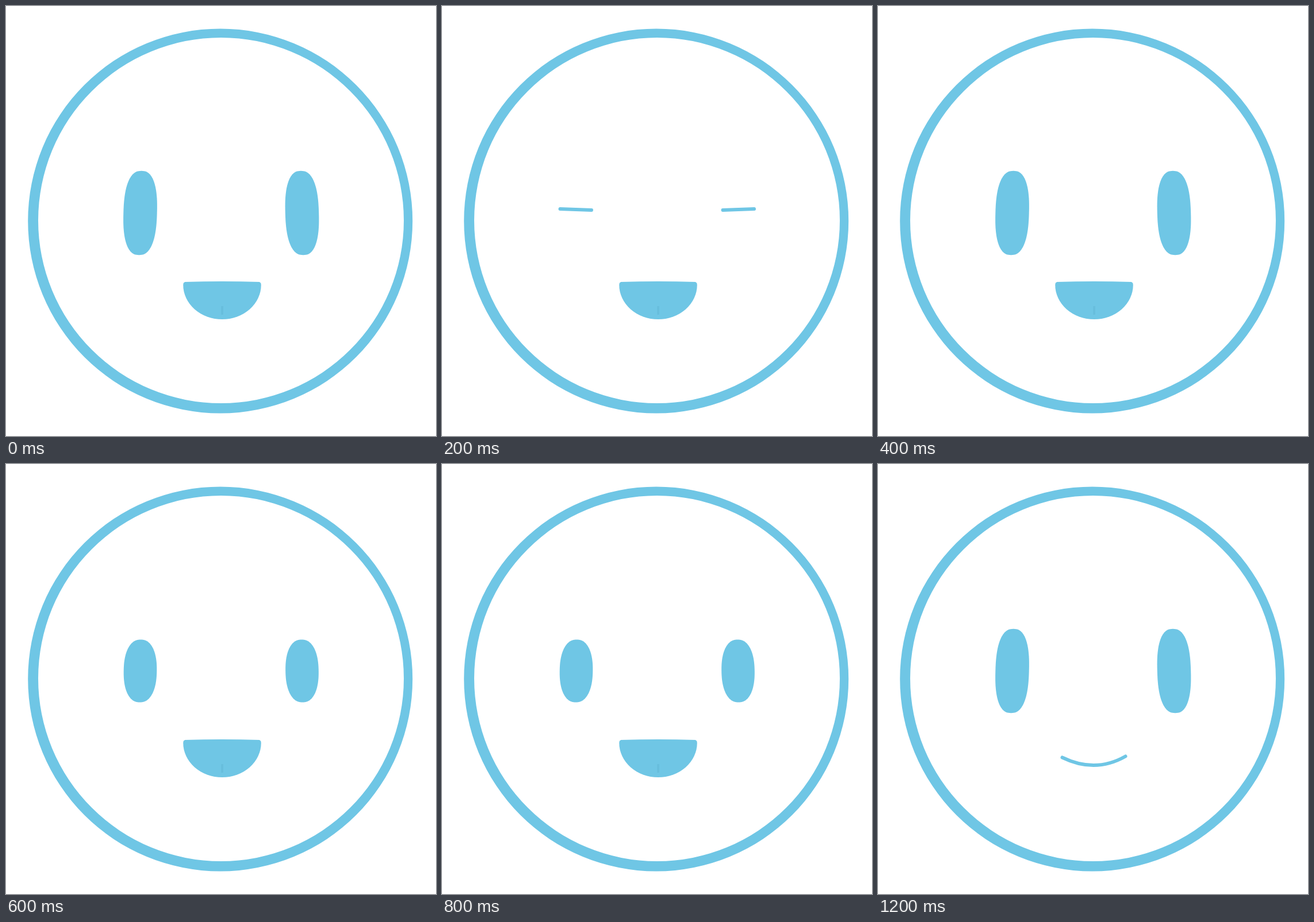
These frames come from a looping animation (748 px wide and 748 px high, 1.7 s). An HTML page with a canvas:

```html
<!DOCTYPE html>
<html lang="en">
<head>
<meta charset="utf-8">
<title>Blinking smiley</title>
<style>
  html, body { margin: 0; width: 100%; height: 100%; overflow: hidden; background: #fff; }
  canvas { display: block; }
</style>
</head>
<body>
<canvas id="stage" width="748" height="748"></canvas>
<script>
const ctx = document.getElementById('stage').getContext('2d');
const SIZE = 748, LOOP = 1700, STEP = 100, TAU = Math.PI * 2;
const BLUE = '#6fc6e5', SHADE = '#68bedd';
const BLINKS = [2, 7];      // steps at which the eyes are shut
const MOUTH_OPEN_UNTIL = 9; // last step of the full laugh
const MOUTH_SHUT = 3;       // steps from laugh to smile

const clamp = (v, lo, hi) => Math.max(lo, Math.min(hi, v));

function ring() {
  ctx.beginPath();
  ctx.arc(372.7, 374, 334.5, 0, TAU);
  ctx.moveTo(692, 373);
  ctx.arc(374, 373, 318, 0, TAU);
  ctx.fill('evenodd');
}

// Superellipse whose rows slide sideways by `lean` per pixel of height.
function oval(cx, cy, rx, ry, power, lean) {
  const bend = v => Math.sign(v) * Math.abs(v) ** (2 / power);
  ctx.beginPath();
  for (let a = 0; a < TAU; a += TAU / 120) {
    const y = ry * bend(Math.sin(a));
    ctx.lineTo(cx + rx * bend(Math.cos(a)) - lean * y, cy + y);
  }
  ctx.fill();
}

function eye(open) {
  if (open === 0) {
    ctx.beginPath();
    ctx.moveTo(205.5, 353);
    ctx.lineTo(260, 355);
    ctx.stroke();
  } else {
    oval(233.5, 360, 28.4 + open * 0.4, 36 + open * 18.6, 2.1 + open * 0.18, open * 0.014);
  }
}

// open: 0 shut, 1 half, 2 wide
function eyes(open) {
  eye(open);
  ctx.save();
  ctx.translate(748.5, 0);
  ctx.scale(-1, 1);
  eye(open);
  ctx.restore();
}

function smile() {
  ctx.beginPath();
  ctx.moveTo(320.5, 510.5);
  ctx.quadraticCurveTo(378, 538.5, 430.5, 508.5);
  ctx.stroke();
}

// shut: 0 is the full laugh, MOUTH_SHUT the closed smile
function mouth(shut) {
  if (shut === MOUTH_SHUT) return smile();
  const cx = 376 - shut / 2, rx = 67.8 - shut * 6;
  const top = 480 + shut * 12, bottom = 545 - shut * 8, side = top + 5;
  ctx.beginPath();
  ctx.ellipse(cx, side, rx, bottom - side, 0, 0, Math.PI);
  ctx.lineTo(cx - rx + 0.5, top + 2);
  ctx.lineTo(cx - rx + 3, top);
  ctx.quadraticCurveTo(cx, top - 2 + shut, cx + rx - 3, top + shut);
  ctx.lineTo(cx + rx - 0.5, top + 2 + shut);
  ctx.fill();
  ctx.fillStyle = SHADE;
  ctx.fillRect(374, 522, 4, Math.min(15, bottom - 523));
}

function draw(t) {
  const step = Math.floor(t / STEP);
  const fromBlink = Math.min(...BLINKS.map(b => Math.abs(step - b)));
  ctx.fillStyle = '#fff';
  ctx.fillRect(0, 0, SIZE, SIZE);
  ctx.fillStyle = ctx.strokeStyle = BLUE;
  ctx.lineWidth = 6;
  ctx.lineCap = 'round';
  ring();
  eyes(Math.min(2, fromBlink));
  mouth(clamp(step - MOUTH_OPEN_UNTIL, 0, MOUTH_SHUT));
}

const start = performance.now();
function tick() {
  draw((performance.now() - start) % LOOP);
  requestAnimationFrame(tick);
}
tick();
</script>
</body>
</html>
```
